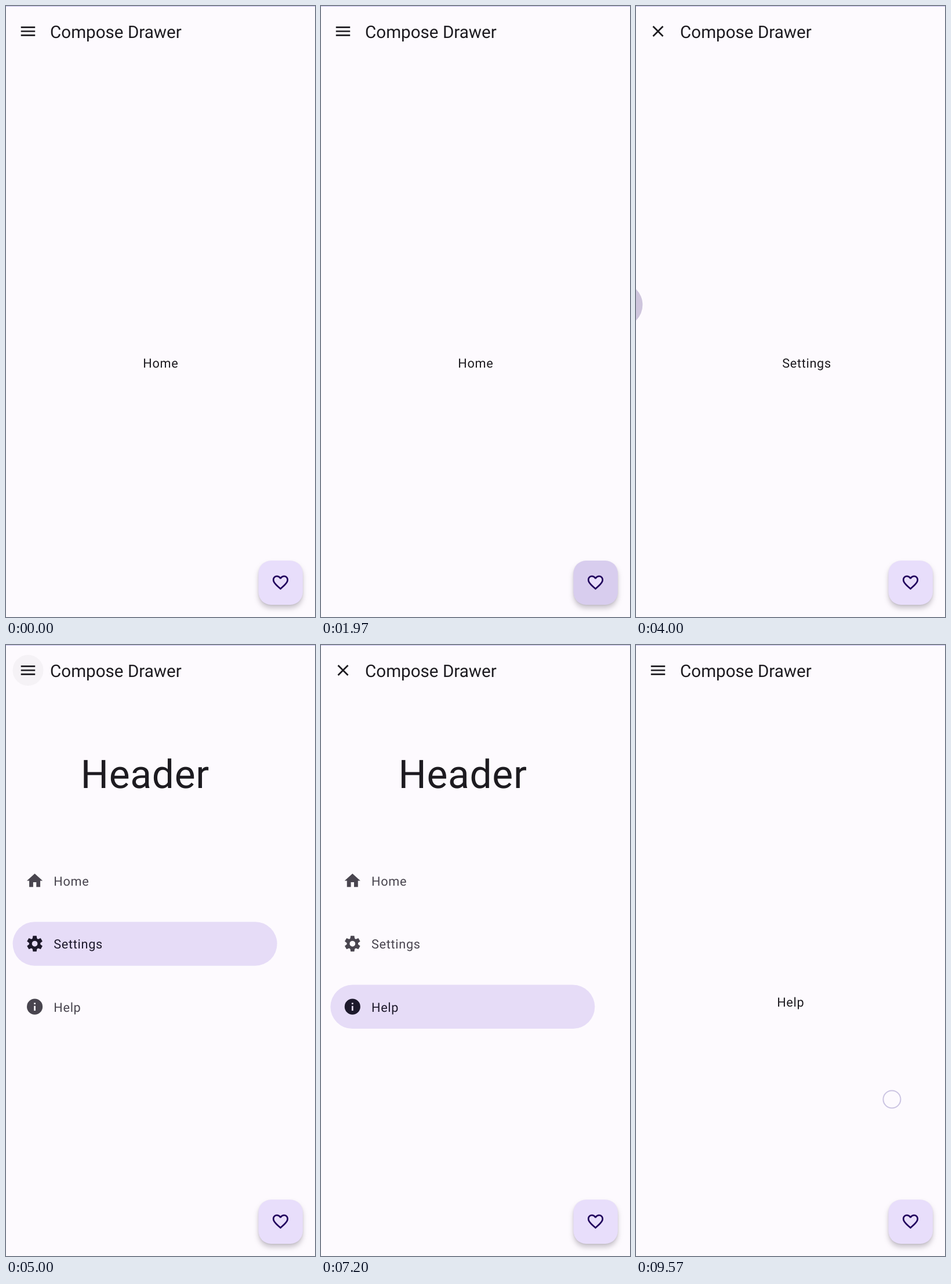
An HTML page for the animation above (9610 ms loop, 533 by 1051 pixels).

```html
<!DOCTYPE html>
<html lang="en">
<head>
<meta charset="utf-8">
<title>Compose Drawer</title>
<style>
  html, body { margin: 0; width: 100%; height: 100%; overflow: hidden; background: #fdfafe; }
  svg { display: block; width: 533px; height: 1051px; font: 21.71px Roboto, sans-serif; fill: #1d1b20; }
  text { text-rendering: geometricPrecision; }
  .body { letter-spacing: .68px; }
  #fab { fill: #e8defb; filter: drop-shadow(0 1px 1px rgba(60, 50, 70, .1)) drop-shadow(0 6px 4px rgba(60, 50, 70, .26)); }
  #ring { fill: #fdfafe; fill-opacity: .5; stroke: #cbc4e2; stroke-width: 2; }
</style>
</head>
<body>
<svg viewBox="0 0 533 1051">
  <defs>
    <path id="menu" d="M3 18h18v-2H3zM3 13h18v-2H3zM3 6v2h18V6z"/>
    <path id="close" d="M19 6.41L17.59 5 12 10.59 6.41 5 5 6.41 10.59 12 5 17.59 6.41 19 12 13.41 17.59 19 19 17.59 13.41 12z"/>
    <path id="home" d="M10 20v-6h4v6h5v-8h3L12 3 2 12h3v8z"/>
    <path id="info" fill-rule="evenodd" d="M12 2a10 10 0 1 0 0 20 10 10 0 1 0 0-20zM13 17h-2v-6h2zM13 9h-2V7h2z"/>
    <path id="heart" d="M12 21.35l-1.45-1.32C5.4 15.36 2 12.28 2 8.5 2 5.42 4.42 3 7.5 3c1.74 0 3.41.81 4.5 2.09C13.09 3.81 14.76 3 16.5 3 19.58 3 22 5.42 22 8.5c0 3.78-3.4 6.86-8.55 11.54z"/>
    <path id="heartHole" d="M12.1 18.55l-.1.1-.11-.1C7.14 14.24 4 11.39 4 8.5 4 6.5 5.5 5 7.5 5c1.54 0 3.04.99 3.57 2.36h1.87C13.46 5.99 14.96 5 16.5 5c2 0 3.5 1.5 3.5 3.5 0 2.89-3.14 5.74-7.9 10.05z"/>
    <g id="gear"><circle cx="12" cy="12" r="5.4" fill="none" stroke="currentColor" stroke-width="3.6"/></g>
  </defs>

  <rect width="533" height="1" fill="#c3bce9"/>
  <text id="page" class="body" y="621.5" text-anchor="middle"></text>

  <g id="drawer">
    <text class="body" x="244.5" y="246" text-anchor="middle" font-size="67.7">Header</text>
  </g>

  <circle id="menuRipple" cx="38" cy="43.5" r="26.5"/>
  <use id="nav" transform="translate(21.7 27.2) scale(1.357)"/>
  <text x="76" y="55" font-size="29.6">Compose Drawer</text>

  <rect id="fab" x="435.5" y="954" width="76.4" height="76" rx="21.7"/>
  <rect id="fabRipple" x="435.5" y="954" width="76.4" height="76" rx="21.7" fill="#21005d"/>
  <g transform="translate(457.2 975.4) scale(1.357)">
    <use href="#heart" fill="#21005d"/>
    <use id="hole" href="#heartHole" fill="#e8defb"/>
  </g>
  <circle id="ring" r="15"/>
</svg>
<script>
const LOOP = 9610, DRAWER = 488.6, NS = 'http://www.w3.org/2000/svg';
const $ = id => document.getElementById(id);
const clamp = v => Math.max(0, Math.min(1, v));
const within = (t, a, b) => t >= a && t < b;

function add(parent, tag, attrs, text = '') {
  const el = parent.appendChild(document.createElementNS(NS, tag));
  for (const key in attrs) el.setAttribute(key, attrs[key]);
  el.textContent = text;
  return el;
}

for (let a = 0; a < 360; a += 60)
  add($('gear'), 'path', { d: 'M9.7 2h4.6l.7 4.5H9z', transform: `rotate(${a} 12 12)`, fill: 'currentColor' });

const pages = ['Home', 'Settings', 'Help'];
const items = pages.map((name, i) => {
  const g = add($('drawer'), 'g', { transform: `translate(0 ${367.8 + i * 108.4})` });
  const box = { x: 16.3, width: 456, height: 75.5, rx: 37.75 };
  const pill = add(g, 'rect', { ...box, fill: '#e6dcf7' });
  const ripple = add(g, 'rect', box);
  const label = add(g, 'g', {});
  add(label, 'use', { href: '#' + ['home', 'gear', 'info'][i], transform: 'translate(38 21.3) scale(1.357)' });
  add(label, 'text', { x: 87, y: 46, class: 'body' }, name);
  return { pill, ripple, label };
});

// Cubic bezier (.4, 0, .2, 1)
function ease(x) {
  let lo = 0, hi = 1;
  for (let i = 0; i < 24; i++) {
    const s = (lo + hi) / 2, r = 1 - s;
    if (1.2 * r * r * s + .6 * r * s * s + s * s * s < x) lo = s; else hi = s;
  }
  return lo * lo * (3 - 2 * lo);
}

// Drawer moves: start, duration, open or closed afterwards
const moves = [
  [2773, 256, 1], [3819, 256, 0], [4778, 256, 1],
  [5883, 256, 0], [6640, 520, 1], [7760, 480, 0]
];

// Pointer rings: start, end, opacity, then start, bend and end of the path
const rings = [
  [370, 850, 1, 446, 786, 525, 880, 484, 996],
  [1630, 1800, .7, 484, 996, 484, 996, 484, 996],
  [2700, 2920, .5, 56, 54, 60, 58, 74, 70],
  [3730, 3860, .5, 250, 514, 250, 514, 250, 514],
  [4700, 4860, .5, 56, 54, 56, 54, 56, 54],
  [5800, 5930, .5, 250, 622, 250, 622, 250, 622],
  [9300, LOOP, 1, 434, 798, 440, 789, 442, 779]
];

const ripple = (t, a, b) => clamp((t - a) / 75) * clamp((b - t) / 150);
const fade = (el, v) => el.setAttribute('opacity', v);

function draw(now) {
  const t = now % LOOP;
  let shift = 0, open = 0;
  for (const [start, span, to] of moves) {
    if (t < start) break;
    const p = ease(clamp((t - start) / span));
    shift = DRAWER * (to ? p : 1 - p);
    if (t >= start + span) open = to;
  }
  const page = t < 3810 ? 0 : t < 5880 ? 1 : 2;

  $('page').textContent = pages[page];
  $('page').setAttribute('x', 266.8 + shift);
  $('drawer').setAttribute('transform', `translate(${shift - DRAWER} 0)`);
  $('nav').setAttribute('href', open ? '#close' : '#menu');

  items.forEach(({ pill, ripple: wave, label }, i) => {
    const on = i === page, color = on ? '#1d192b' : '#49454f';
    fade(pill, on ? 1 : 0);
    fade(wave, i ? .12 * ripple(t, [0, 3735, 5805][i], [0, 4150, 6200][i]) : 0);
    label.setAttribute('fill', color);
    label.setAttribute('color', color);
  });

  fade($('menuRipple'), .13 * Math.max(ripple(t, 2700, 3040), ripple(t, 4700, 5040)));
  fade($('fabRipple'), .09 * Math.max(ripple(t, 850, 1280), ripple(t, 1630, 2100)));
  fade($('hole'), within(t, 1000, 1780) ? 0 : 1);

  const ring = rings.find(([a, b]) => within(t, a, b));
  fade($('ring'), ring ? ring[2] : 0);
  if (ring) {
    const [a, b, , x0, y0, x1, y1, x2, y2] = ring;
    const p = clamp((t - a) / (b - a)), q = 1 - p;
    $('ring').setAttribute('cx', q * q * x0 + 2 * p * q * x1 + p * p * x2);
    $('ring').setAttribute('cy', q * q * y0 + 2 * p * q * y1 + p * p * y2);
  }
}

const began = performance.now();
function tick() {
  draw(performance.now() - began);
  requestAnimationFrame(tick);
}
tick();
</script>
</body>
</html>
```
